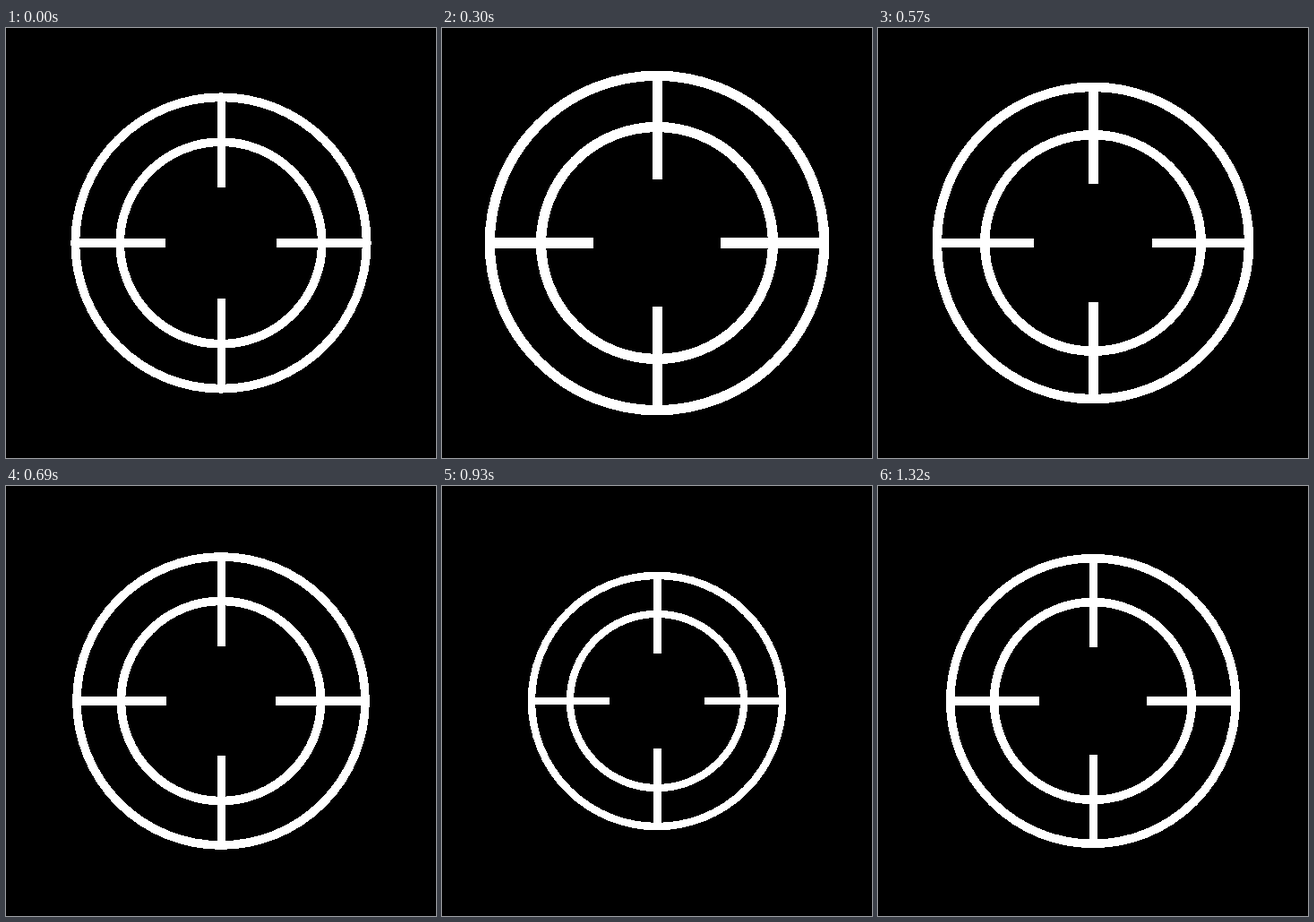
An HTML page for the animation above (1.35 s loop, 480 by 480 pixels).

```html
<!DOCTYPE html>
<html lang="en">
<head>
<meta charset="utf-8">
<title>Pulsing crosshair</title>
<style>
  html, body { margin: 0; height: 100%; overflow: hidden; background: #000; }
  svg { display: block; width: 100%; height: 100%; }
</style>
</head>
<body>
<svg viewBox="-240 -240 480 480" shape-rendering="crispEdges">
  <g id="sight" fill="none" stroke="#fff" stroke-width="9.8">
    <circle r="162.7"/>
    <circle r="112.8"/>
    <path d="M.5-163V-61.6M.5 163V61.6M-163 0H-61.6M163 0H61.6"/>
  </g>
</svg>
<script>
  const LOOP = 1350, STEP = 30;
  const sight = document.getElementById('sight');

  function draw() {
    const t = Math.floor(performance.now() % LOOP / STEP) * STEP;
    const scale = 1 + 0.15 * Math.sin(2 * Math.PI * t / LOOP);
    sight.setAttribute('transform', `scale(${scale})`);
    requestAnimationFrame(draw);
  }
  draw();
</script>
</body>
</html>
```
